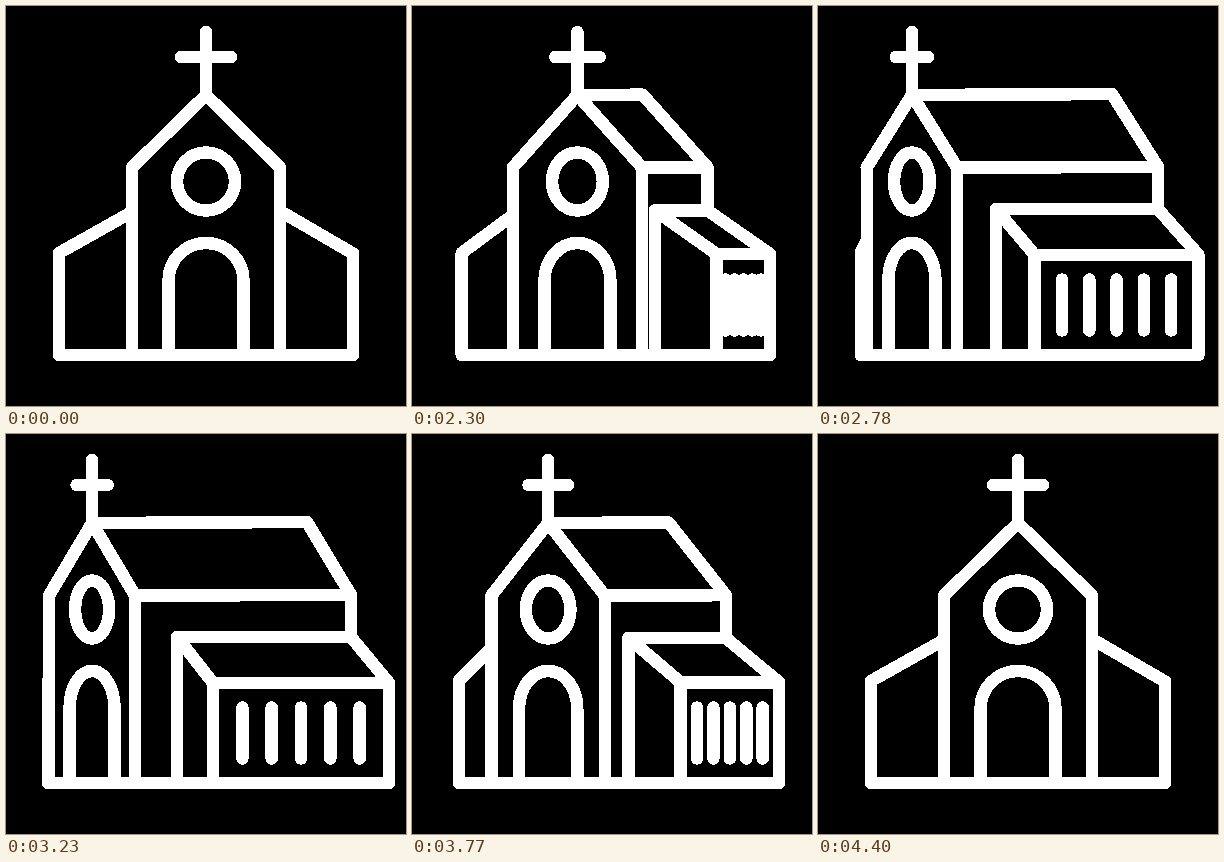
These frames come from a looping animation (400x400 px, 4430 ms). An HTML page:

```html
<!DOCTYPE html>
<html lang="en">
<head>
<meta charset="utf-8">
<title>Turning church</title>
<style>
  html, body { margin: 0; width: 100%; height: 100%; overflow: hidden; background: #000; }
  svg { display: block; width: 100vw; height: 100vh; }
  path {
    fill: none; stroke: #fff; stroke-width: 12.5; stroke-linecap: round; stroke-linejoin: round;
    shape-rendering: crispEdges;
  }
  #front { fill: #000; }
</style>
</head>
<body>
<svg viewBox="0 0 400 400">
  <path id="back"/>
  <path id="front"/>
  <path id="details"/>
</svg>
<script>
const LOOP = 4430, TURN_START = 2000, TURN_TIME = 1200;
const RIDGE = 89, EAVE = 161.5, GROUND = 349;
const [back, front, details] = ['back', 'front', 'details'].map(id => document.getElementById(id));

// Cubic easing curve with control points (x1, 0) and (x2, 1)
function bezier(s, x1, x2) {
  s = Math.min(1, Math.max(0, s));
  let low = 0, high = 1, u = 0.5;
  for (let i = 0; i < 24; i++) {
    u = (low + high) / 2;
    const v = 1 - u;
    if (3 * u * v * v * x1 + 3 * u * u * v * x2 + u * u * u < s) low = u;
    else high = u;
  }
  return u * u * (3 - 2 * u);
}

function turnAt(t) {
  const s = (t - TURN_START) / TURN_TIME;
  return s < 1 ? bezier(s, 0.4, 0.1) : 1 - bezier(s - 1, 0.6, 0.4);
}

const line = (...points) => 'M' + points.map(p => p.join(' ')).join('L');

function draw(turn) {
  const mix = (from, to) => from + (to - from) * turn;
  const apex = mix(200, 86), left = mix(126, 43), right = mix(274, 129);
  const backApex = mix(200, 301), backEave = mix(274, 345);
  const leftWing = mix(53, 42), wingInner = mix(274, 171);
  const wingFront = mix(347, 207), wingBack = mix(347, 383);
  const wingTop = mix(205, 203), wingEave = mix(247.5, 249);
  const cross = mix(25, 15.5), door = mix(37.5, 22.5), rose = mix(29, 17);

  back.setAttribute('d',
    line([mix(126, 57), 206], [leftWing, 247], [leftWing, GROUND]) +
    line([apex, RIDGE], [backApex, mix(RIDGE, 88)], [backEave, mix(EAVE, 161)], [right, EAVE]) +
    line([backEave, EAVE], [backEave, wingTop], [wingBack, wingEave], [wingBack, GROUND]) +
    line([backEave, wingTop], [wingInner, wingTop], [wingFront, wingEave], [wingBack, wingEave]) +
    line([wingInner, wingTop], [wingInner, GROUND]) +
    line([wingFront, wingEave], [wingFront, GROUND]));

  front.setAttribute('d',
    line([left, GROUND], [left, EAVE], [apex, RIDGE], [right, EAVE], [right, GROUND]));

  let d = line([leftWing, GROUND], [wingBack, GROUND]) +
    line([apex, 26], [apex, RIDGE]) +
    line([apex - cross, 51], [apex + cross, 51]) +
    `M${apex - rose} 175.5a${rose} 29 0 1 1 ${2 * rose} 0a${rose} 29 0 1 1 ${-2 * rose} 0z` +
    `M${apex - door} ${GROUND}V274.5a${door} 37.5 0 0 1 ${2 * door} 0V${GROUND}`;
  for (let i = 1; i <= 5; i++) {
    const x = wingFront + (wingBack - wingFront) * i / 6;
    d += line([x, 273.5], [x, 324.5]);
  }
  details.setAttribute('d', d);
}

function frame() {
  draw(turnAt(performance.now() % LOOP));
  requestAnimationFrame(frame);
}
frame();
</script>
</body>
</html>
```
